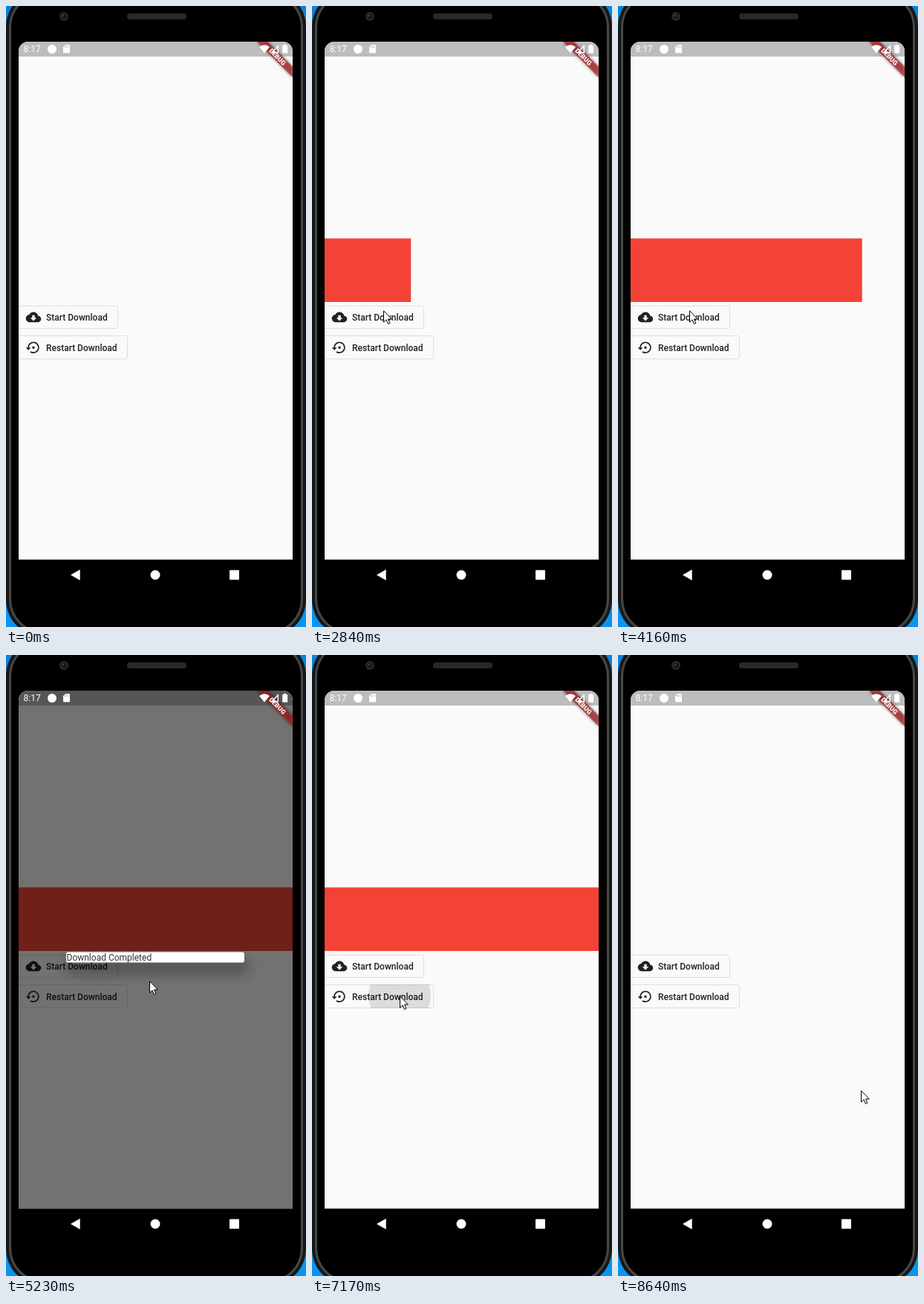
Animation, 404 px wide and 835 px high, one loop 8.72 s. Source, as an HTML page:

```html
<!DOCTYPE html>
<html lang="en">
<head>
<meta charset="utf-8">
<title>Download progress</title>
<style>
  html, body { margin: 0; width: 100%; height: 100%; overflow: hidden; background: linear-gradient(#0984dc, #0b93ee); }
  svg { display: block; font-family: Roboto, sans-serif; font-size: 12px; }
  .button { fill: #fafafa; stroke: #dedede; }
  .ink { fill: #212121; }
  .label { fill: #212121; font-weight: 500; }
  .white { fill: #fff; }
</style>
</head>
<body>
<svg width="404" height="835" viewBox="0 0 404 835">
  <defs>
    <clipPath id="screen"><rect x="17" y="48" width="369" height="738" rx="13"/></clipPath>
    <clipPath id="startClip"><rect x="17" y="403" width="134" height="31" rx="2"/></clipPath>
    <clipPath id="restartClip"><rect x="17" y="443" width="147" height="32" rx="2"/></clipPath>
    <filter id="soft" x="-50%" y="-300%" width="200%" height="700%"><feGaussianBlur stdDeviation="9"/></filter>
    <filter id="bannerBlur" x="-30%" y="-30%" width="160%" height="160%"><feGaussianBlur stdDeviation="2.2"/></filter>
  </defs>

  <!-- phone body -->
  <rect x="0" y="-22" width="404" height="870" rx="50" fill="#161717"/>
  <rect x="5.5" y="-16.5" width="393" height="859" rx="45" fill="#000" stroke="#454747" stroke-width="3"/>
  <circle cx="78" cy="14" r="6" fill="#292929"/>
  <circle cx="78" cy="14" r="3.5" fill="#151719"/>
  <circle cx="77" cy="13" r="1.2" fill="#45484b"/>
  <rect x="163" y="10" width="80" height="8" rx="3.5" fill="#282828"/>

  <g clip-path="url(#screen)">
    <!-- app page -->
    <rect x="17" y="48" width="369" height="696.4" fill="#fafafa"/>
    <rect x="17" y="48" width="369" height="20" fill="#bdbdbd"/>
    <rect id="bar" x="17" y="312.5" width="0" height="85.5" fill="#f44336"/>

    <rect class="button" x="16.5" y="403.5" width="134" height="30" rx="2"/>
    <circle id="startRipple" cx="96" cy="409" clip-path="url(#startClip)"/>
    <path class="ink" transform="translate(26.7 408) scale(.857)" d="M19.35 10.04C18.67 6.59 15.64 4 12 4 9.11 4 6.6 5.64 5.35 8.04 2.34 8.36 0 10.91 0 14c0 3.31 2.69 6 6 6h13c2.76 0 5-2.24 5-5 0-2.64-2.05-4.78-4.65-4.96zM17 13l-5 5-5-5h3V9h4v4h3z"/>
    <text class="label" x="54" y="423">Start Download</text>

    <rect class="button" x="16.5" y="443.5" width="147" height="31" rx="2"/>
    <circle id="restartRipple" cx="118" cy="458" clip-path="url(#restartClip)"/>
    <path class="ink" transform="translate(26.7 449) scale(.857)" d="M14 12c0-1.1-.9-2-2-2s-2 .9-2 2 .9 2 2 2 2-.9 2-2zm-2-9c-4.97 0-9 4.03-9 9H0l4 4 4-4H5c0-3.87 3.13-7 7-7s7 3.13 7 7-3.13 7-7 7c-1.51 0-2.91-.49-4.06-1.3l-1.42 1.44C8.04 20.3 9.94 21 12 21c4.97 0 9-4.03 9-9s-4.03-9-9-9z"/>
    <text class="label" x="54" y="464">Restart Download</text>

    <!-- dialog -->
    <rect id="barrier" x="17" y="48" width="369" height="696.4" opacity="0"/>
    <g id="dialog" opacity="0">
      <rect x="81" y="410" width="244" height="18" opacity=".32" filter="url(#soft)"/>
      <rect class="white" x="81" y="399.5" width="240" height="14" rx="3"/>
      <text x="81.5" y="411" fill="#333">Download Completed</text>
    </g>

    <!-- debug banner -->
    <path d="M338 48h14.5L386 81.5V96z" opacity=".5" filter="url(#bannerBlur)"/>
    <path d="M338 48h14.5L386 81.5V96z" fill="#b71c1c" fill-opacity=".627"/>
    <text class="white" transform="translate(365.6 68.4) rotate(45)" y="3" text-anchor="middle" font-size="8.7" font-weight="900">DEBUG</text>

    <!-- status bar -->
    <g class="white">
      <text x="23.5" y="62.3">8:17</text>
      <circle cx="62" cy="58" r="6"/>
      <path d="M80 52.3h5q1 0 1 1v9q0 1-1 1h-7q-1 0-1-1v-7z"/>
      <path d="M341 55q7-5.5 14 0l-7 8.5z"/>
      <path fill-rule="evenodd" d="M367 52v11.5h-11zM365.6 55.5l-3.8 4v2.6h3.8z"/>
      <path d="M374 53v-1.2h3.4V53h1.8v10.5h-7V53z"/>
    </g>
    <path d="M79.5 54v2M81.7 54v2M83.9 54v2" stroke="#aaa" stroke-width=".9"/>
  </g>

  <!-- navigation bar -->
  <g class="white">
    <path d="M87 765l12.7-7.2v14.4z"/>
    <circle cx="201" cy="765" r="6.5"/>
    <rect x="301" y="758.5" width="13" height="13" rx=".8"/>
  </g>

  <g id="cursor" visibility="hidden">
    <circle id="press" r="15" fill="#ff0" fill-opacity=".47"/>
    <path d="M.5.8v15.4l3.5-3.4 2.5 5.7 2.4-1-2.4-5.5h4.9z" fill="#fff" stroke="#000"/>
  </g>
</svg>

<script>
const LOOP = 8720, WIDTH = 369, HOLD = 120;
const TAPS = [1230, 5860, 6870];

// The cursor rests at each point, then follows a curve to the next one
const START = [321, 743];
const MOVES = [
  { from: 140, until: 1060, via: [110, 295], to: [96, 409] },
  { from: 4930, until: 5630, via: [226, 443], to: [277, 476] },
  { from: 6420, until: 6870, via: [210, 520], to: [118, 458] },
  { from: 8250, until: 8640, via: [222, 521], to: [327, 585] }
];

const set = (id, attrs) => {
  const node = document.getElementById(id);
  for (const name in attrs) node.setAttribute(name, attrs[name]);
};

// 0 before a, 1 after b, linear between
const ramp = (t, a, b) => Math.min(1, Math.max(0, (t - a) / (b - a)));

const curve = (a, b, c, u) => a * (1 - u) ** 2 + 2 * b * u * (1 - u) + c * u * u;

function cursorAt(t) {
  return MOVES.reduce((pos, { from, until, via, to }) => {
    const u = ramp(t, from, until);
    return pos.map((p, i) => curve(p, via[i], to[i], u));
  }, START).map(Math.round);
}

function ripple(id, t, start) {
  const p = ramp(t, start, start + 310);
  set(id, { r: 14 + 86 * p ** 1.5, opacity: p > 0 ? .12 * Math.min(1, 3 * (1 - p)) : 0 });
}

function render(t) {
  const [x, y] = cursorAt(t);
  const fade = ramp(t, 4290, 4450) - ramp(t, 6070, 6300);
  set('cursor', { transform: `translate(${x} ${y})`, visibility: t < 140 ? 'hidden' : 'visible' });
  set('press', { opacity: TAPS.some(tap => t >= tap && t < tap + HOLD) ? 1 : 0 });
  set('bar', { width: WIDTH * (ramp(t, 2056, 4548) - ramp(t, 7215, 8170)) });
  set('barrier', { opacity: .54 * Math.sqrt(fade) });
  set('dialog', { opacity: fade });
  ripple('startRipple', t, 1760);
  ripple('restartRipple', t, 7024);
}

const origin = performance.now();
function frame() {
  render((performance.now() - origin) % LOOP);
  requestAnimationFrame(frame);
}
frame();
</script>
</body>
</html>
```
